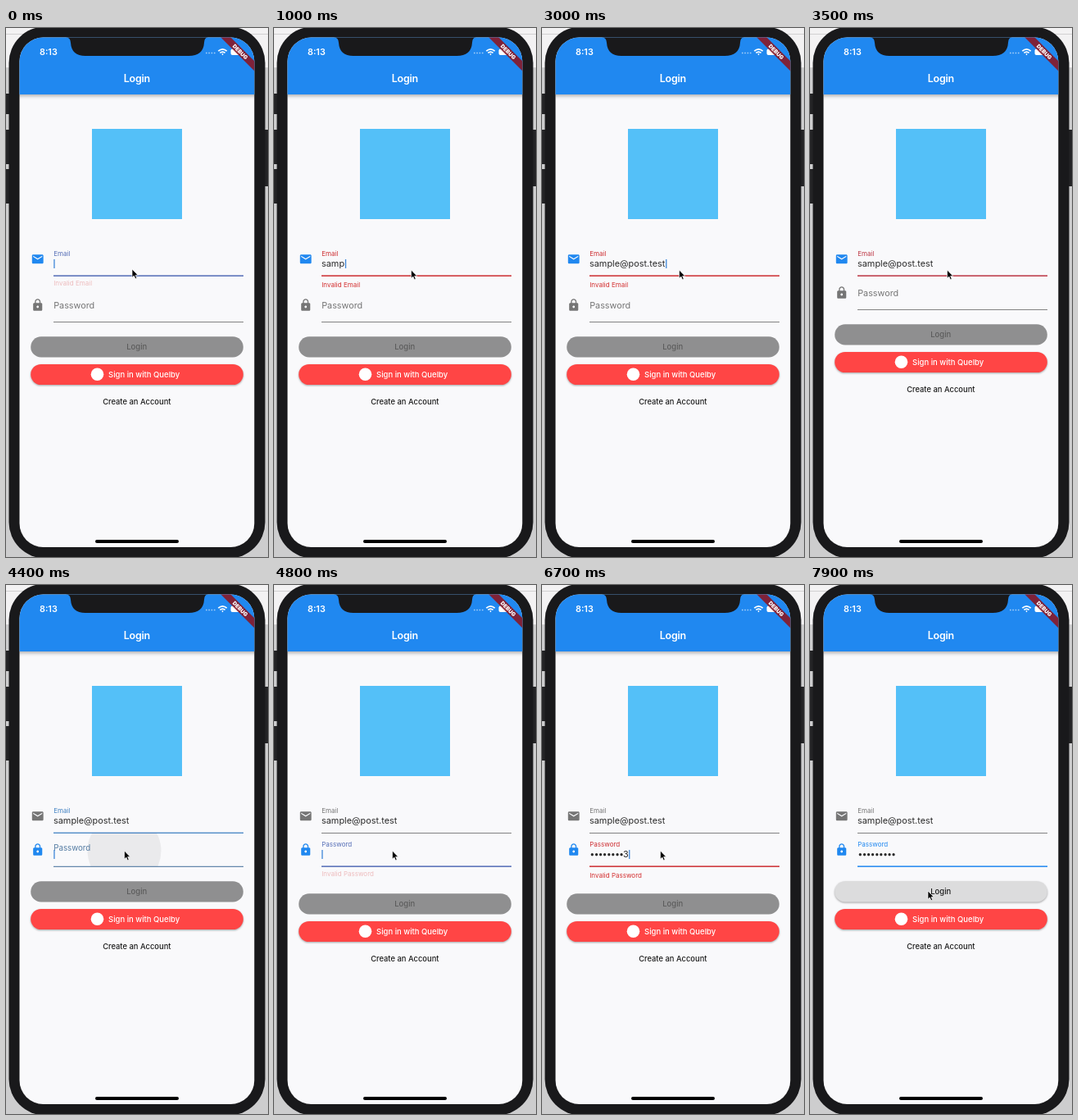
These frames come from a looping animation (320 px wide and 645 px high, 8000 ms). An HTML page:

```html
<!DOCTYPE html>
<html lang="en">
<head>
<meta charset="utf-8">
<title>Login form</title>
<style>
  html, body { margin: 0; width: 320px; height: 645px; overflow: hidden; background: #cdcdce; }
  svg { display: block; }
  text { font-family: Inter, "Open Sans", sans-serif; white-space: pre; }
  .mid { text-anchor: middle; }
  .input { font-size: 10.9px; fill: #2b2b2b; }
  .small { font-size: 8px; }
  .button { font-size: 9.5px; font-weight: 500; }
  .error { fill: #d32f2f; }
  .raised { filter: drop-shadow(0 1.2px .8px rgba(0, 0, 0, .35)); }
</style>
</head>
<body>
<svg width="320" height="645" viewBox="0 0 320 645">
  <defs>
    <clipPath id="screen"><rect x="16.5" y="11.6" width="286.8" height="621.4" rx="29"/></clipPath>
    <clipPath id="fieldBox"><rect x="58" y="302.5" width="232" height="41.5"/></clipPath>
  </defs>

  <rect width="320" height="49" fill="#f3f2f3"/>
  <path d="M0 7.5H320M0 48.5H320" stroke="#d2d1d2"/>
  <path d="M0 80h6v25H0zM0 124h6v42H0zM0 172h6v42H0zM314 124h6v69h-6z" fill="#242426"/>
  <rect x="3.5" y="-1.5" width="313" height="648" rx="44" fill="#19191b"/>

  <g clip-path="url(#screen)">
    <rect x="16" y="11" width="288" height="623" fill="#f9f9fb"/>
    <rect x="10" y="0" width="300" height="81" fill="#2088f0" style="filter:drop-shadow(0 2px 2px rgba(0,0,0,.3))"/>
    <path d="M73 11Q79 12 79 18Q80 34 97 34H223Q241 34 242 18Q242 12 247 11Z" fill="#19191b"/>
    <text x="41" y="32.7" font-size="10.8" font-weight="600" fill="#fff">8:13</text>
    <path d="M244 30.5H256" stroke="#a5cff8" stroke-width="1.6" stroke-dasharray="1.6 1.7"/>
    <g fill="none" stroke="#fff" stroke-width="1.7">
      <path d="M259.3 28.2Q264.5 23.4 269.7 28.2M261.4 30.4Q264.5 27.7 267.6 30.4"/>
      <circle cx="264.5" cy="32" r=".6" fill="#fff" stroke-width="1"/>
    </g>
    <rect x="274.5" y="25.5" width="14" height="7.5" rx="2" fill="#fff"/>
    <g transform="translate(286 29) rotate(45)">
      <rect x="-40" y="-4.3" width="80" height="8.6" fill="#86192a" fill-opacity=".92"/>
      <text class="mid" y="2.4" font-size="6.6" font-weight="900" fill="#fff">DEBUG</text>
    </g>
    <text class="mid" x="159.8" y="66" font-size="12.5" font-weight="600" letter-spacing="-.3" fill="#fff">Login</text>
    <rect x="105" y="123" width="110" height="110" fill="#54c0f8"/>

    <path id="mail" transform="translate(30.4 273.5) scale(.693)" d="M20 4H4c-1.1 0-2 .9-2 2v12c0 1.1.9 2 2 2h16c1.1 0 2-.9 2-2V6c0-1.1-.9-2-2-2zm0 4l-8 5-8-5V6l8 5 8-5v2z"/>
    <text id="mailLabel" class="small" x="58.2" y="278">Email</text>
    <text id="mailText" class="input" x="58" y="291.2"></text>
    <rect id="mailLine" x="58" width="232"/>
    <text id="mailError" class="small error" x="58.2">Invalid Email</text>

    <g id="passField">
      <circle id="ripple" cx="144.5" cy="324" clip-path="url(#fieldBox)"/>
      <path id="lock" transform="translate(30.4 314.6) scale(.693)" d="M18 8h-1V6c0-2.76-2.24-5-5-5S7 3.24 7 6v2H6c-1.1 0-2 .9-2 2v10c0 1.1.9 2 2 2h12c1.1 0 2-.9 2-2V10c0-1.1-.9-2-2-2zm-6 9c-1.1 0-2-.9-2-2s.9-2 2-2 2 .9 2 2-.9 2-2 2zm3.1-9H8.9V6c0-1.71 1.39-3.1 3.1-3.1 1.71 0 3.1 1.39 3.1 3.1v2z"/>
      <text id="passLabel" x="58.2">Password</text>
      <text id="passText" class="input" y="332.3"></text>
      <rect id="passLine" x="58" width="232"/>
      <text id="passError" class="small error" x="58.2">Invalid Password</text>
    </g>
    <rect id="caret" width="1.3" height="11" fill="#3f87d8"/>

    <g id="buttons">
      <rect id="login" x="30.2" y="361.3" width="259.6" height="25.2" rx="12.6"/>
      <text id="loginText" class="button mid" x="159.8" y="377.4">Login</text>
      <rect class="raised" x="30.2" y="394.9" width="259.6" height="25.2" rx="12.6" fill="#ff4545"/>
      <circle cx="111.5" cy="407.2" r="7.8" fill="#fff"/>
      <text class="button" x="125" y="410.9" fill="#fff">Sign in with Quelby</text>
      <text class="mid" x="159.8" y="443.5" font-size="9.4" font-weight="500" fill="#1c1c1c">Create an Account</text>
    </g>
    <rect x="109" y="624" width="102" height="4" rx="2" fill="#000"/>
  </g>
  <path id="pointer" d="M0 0V10.2L2.3 8.1L4 11.8L5.7 11L4.1 7.4H7.2Z" stroke="#fff" stroke-width=".7"/>
</svg>

<script>
const LOOP = 8000, FRAME = 100;
const BLUE = [32, 136, 240], RED = [205, 45, 48], GRAY = [117, 117, 117];
const EMAIL = 'sample@post.test', PASSWORD = 'latter123';
const EMAIL_KEYS = [500, 650, 800, 1000, 1150, 1300, 1550, 2150, 2250, 2350, 2450, 2550, 2650, 2750, 2850, 2950];
const PASS_KEYS = [4850, 5000, 5150, 5300, 5500, 5680, 5950, 6150, 6400];
const FOCUS = 4340, MAIL_OK = 3480, PASS_BAD = 4740, PASS_OK = 6930;
// start, duration, x, y
const MOVES = [[100, 400, 167.5, 295], [3600, 550, 144.5, 324], [7000, 600, 144, 373]];

const el = Object.fromEntries([...document.querySelectorAll('svg [id]')].map(e => [e.id, e]));
const set = (e, attrs) => { for (const k in attrs) e.setAttribute(k, attrs[k]); };
const ramp = (t, start, length) => Math.min(1, Math.max(0, (t - start) / length));
const lerp = (a, b, p) => a + (b - a) * p;
const mix = (a, b, p) => a.map((v, i) => lerp(v, b[i], p));
const rgb = c => `rgb(${c.map(Math.round)})`;
const typed = (keys, t) => keys.filter(k => k <= t).length;

function drawField(name, focus, error, bottom, errorY, showError) {
  const color = rgb(mix(mix(GRAY, BLUE, focus), RED, error));
  const height = lerp(.9, 1.5, focus);
  set(el[name + 'Label'], { fill: color });
  set(el[name + 'Line'], { fill: color, y: bottom - height, height });
  set(el[name + 'Error'], { y: errorY - 2 * (1 - error), opacity: showError ? error : 0 });
}

function drawCaret(t, x, y) {
  const last = [-300, ...EMAIL_KEYS, FOCUS, ...PASS_KEYS].filter(k => k <= t).pop();
  set(el.caret, { x, y, opacity: (t - last) % 1000 < 500 ? 1 : 0 });
}

function draw(t) {
  const passFocus = ramp(t, FOCUS, 160);
  const mailBad = t < MAIL_OK, passBad = t >= PASS_BAD && t < PASS_OK, valid = t >= PASS_OK;
  const mailError = ramp(t, -60, 200) * (1 - ramp(t, MAIL_OK, 200));
  const passError = ramp(t, PASS_BAD, 200) * (1 - ramp(t, PASS_OK, 200));

  el.mailText.textContent = EMAIL.slice(0, typed(EMAIL_KEYS, t));
  drawField('mail', 1 - passFocus, mailError, 302.9, 315.8, mailBad);
  drawField('pass', passFocus, passError, 343.9, 356.6, passBad);
  set(el.mail, { fill: rgb(t < FOCUS ? BLUE : GRAY) });
  set(el.lock, { fill: rgb(t < FOCUS ? GRAY : BLUE) });
  set(el.passLabel, { y: lerp(326.8, 318.7, passFocus), 'font-size': lerp(10.8, 8, passFocus) });

  // The newest character stays readable for a moment.
  const count = typed(PASS_KEYS, t);
  const reveal = count && t - PASS_KEYS[count - 1] < 1450;
  const dots = reveal ? count - 1 : count;
  el.passText.textContent = '•'.repeat(dots) + (reveal ? PASSWORD[dots] : '');
  set(el.passText, { x: Array.from({ length: count || 1 }, (_, i) => 58.3 + 5.1 * i).join(' ') });

  if (t < FOCUS) drawCaret(t, 58.3 + (el.mailText.textContent && el.mailText.getComputedTextLength() + .5), 282);
  else drawCaret(t, 58.3 + 5.1 * dots + (reveal ? 7 : 0), 323);

  set(el.ripple, { r: 90 * ramp(t, 4200, 400), 'fill-opacity': .06 * (1 - ramp(t, 4400, 250)) });

  set(el.passField, { transform: `translate(0 ${mailBad ? 15 : 0})` });
  set(el.buttons, { transform: `translate(0 ${mailBad || passBad ? 15 : 0})` });
  set(el.login, { fill: valid ? '#dcdcdd' : '#8f8f90', class: valid ? 'raised' : '' });
  set(el.loginText, { fill: valid ? '#1c1c1c' : '#5c5c5c' });

  let x = 154, y = 294;
  for (const [start, length, toX, toY] of MOVES) {
    const p = ramp(t, start, length), eased = p * p * (3 - 2 * p);
    x = lerp(x, toX, eased);
    y = lerp(y, toY, eased);
  }
  set(el.pointer, { transform: `translate(${x} ${y})` });
}

const begin = performance.now();
function tick() {
  const t = (performance.now() - begin) % LOOP;
  draw(Math.floor(t / FRAME) * FRAME);
  requestAnimationFrame(tick);
}
tick();
</script>
</body>
</html>
```
